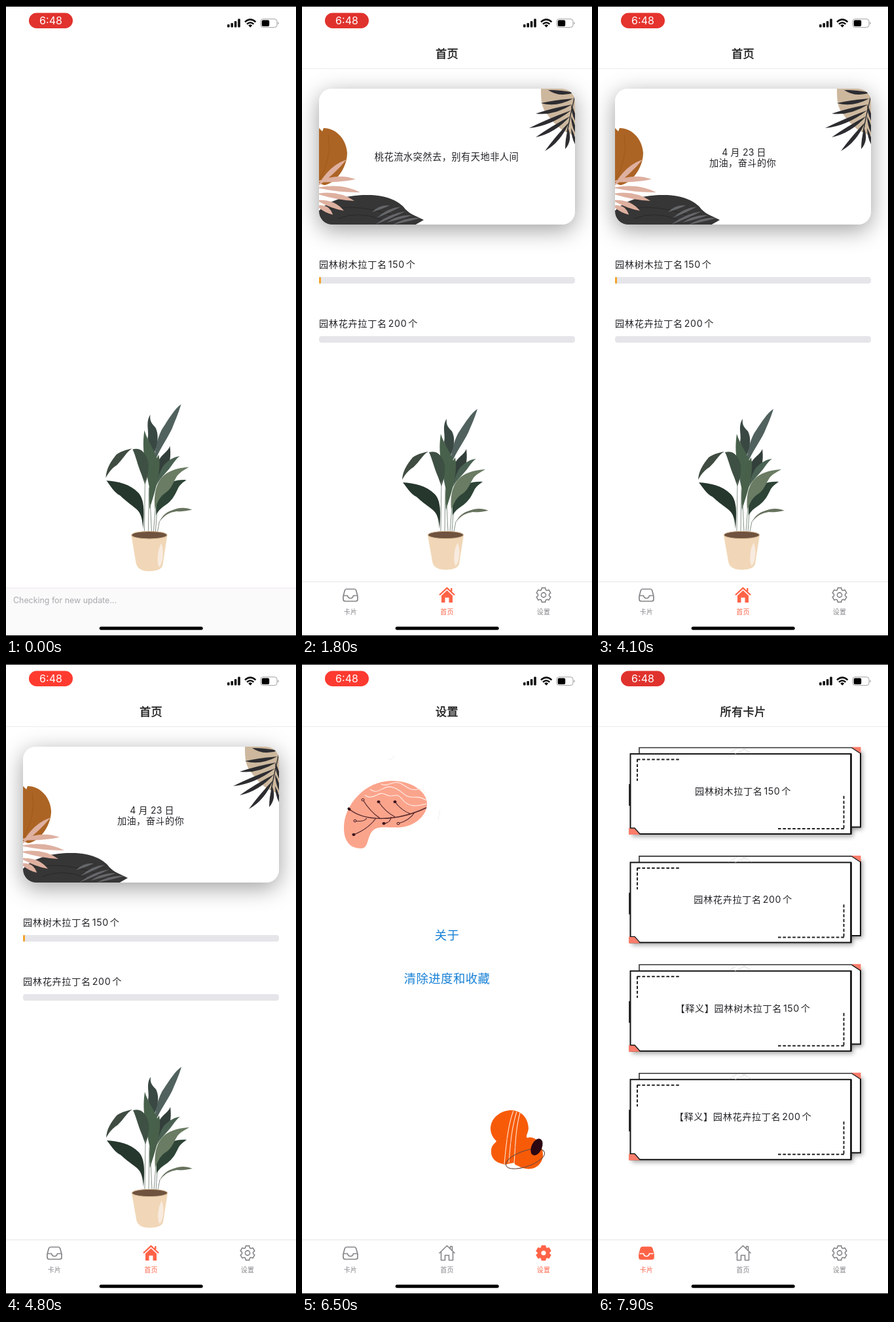
These frames come from a looping animation (443x960 px, 8000 ms). An HTML page:

```html
<!DOCTYPE html>
<html lang="zh-CN">
<head>
<meta charset="utf-8">
<style>
html, body { margin: 0; width: 100%; height: 100%; overflow: hidden; background: #fff; }
svg { display: block; width: 100vw; height: 100vh; }
text { font-family: Inter, "Noto Sans CJK SC", "Noto Sans CJK", sans-serif; }
</style>
</head>
<body>
<svg id="stage" viewBox="0 0 443 960" xmlns="http://www.w3.org/2000/svg"></svg>
<script>
const LOOP = 8000, HOME_AT = 600, SETTINGS_AT = 5000, CARDS_AT = 7650;
const PRESS_AT = 2150, RELEASE_AT = 2370;
const GRAY = '#858589', TOMATO = '#ff6347', INK = '#252529';

const shape = (d, fill) => `<path d="${d}" fill="${fill}"/>`;
const line = (d, color, width = 1, extra = '') =>
  `<path d="${d}" fill="none" stroke="${color}" stroke-width="${width}" ${extra}/>`;
const rect = (x, y, w, h, fill, r = 0, extra = '') =>
  `<rect x="${x}" y="${y}" width="${w}" height="${h}" rx="${r}" fill="${fill}" ${extra}/>`;
const label = (s, x, y, size, fill = INK, spacing = .4, anchor = 'middle', extra = '') =>
  `<text x="${x}" y="${y}" font-size="${size}" fill="${fill}" letter-spacing="${spacing}" text-anchor="${anchor}" ${extra}>${s}</text>`;
const group = (id, body, extra = '') => `<g id="${id}" ${extra}>${body}</g>`;
// Hair space between Chinese characters and digits.
const spaced = s => s.replace(/\d+/, '\u200a$&\u200a');

// Pointed leaf from base to tip; bend pushes the middle sideways.
function leaf(x1, y1, x2, y2, width, fill, bend = 0) {
  const dx = x2 - x1, dy = y2 - y1, len = Math.hypot(dx, dy);
  const side = k => `${x1 + dx * .55 - dy / len * k} ${y1 + dy * .55 + dx / len * k}`;
  return shape(`M${x1} ${y1}Q${side(bend + width)} ${x2} ${y2}Q${side(bend - width)} ${x1} ${y1}Z`, fill);
}

const plant = [
  ['M268 614C258 620 246 640 238 652C232 664 229 676 227 692L231 691C238 676 247 664 254 650C260 636 264 627 268 614Z', '#51625e'],
  ['M221 629C213 641 220 654 217 664L225 690C235 668 233 656 229 648C222 641 220 637 221 629Z', '#394842'],
  ['M251 675C248 684 236 688 233 699C230 711 230 719 231 727C248 712 254 699 251 675Z', '#333f3b'],
  ['M266 690C256 691 247 697 241 704C236 711 233 720 230 734C236 722 245 715 252 706C258 698 261 693 266 690Z', '#4a6253'],
  ['M212 652C208 680 213 690 213 705L220 738C233 718 235 702 230 690C225 677 217 668 212 652Z', '#48614c'],
  ['M234 688C222 704 217 736 220 768C227 744 239 714 234 688Z', '#48604a'],
  ['M194 680C199 690 201 702 208 718L213 732C219 715 220 702 216 693C210 680 203 678 194 680Z', '#3e5043'],
  ['M193 679C182 681 174 684 169 688C160 699 154 708 153 722C158 713 163 707 170 703C180 694 184 684 193 679Z', '#404c42'],
  ['M154 726C172 727 190 731 203 744C212 754 212 770 210 797C209 783 207 774 200 768C190 760 186 758 175 748C165 743 160 733 154 726Z', '#26372d'],
  ['M276 725C260 724 247 729 240 737C231 747 229 758 230 777C234 768 240 765 247 760C257 752 260 744 264 736C268 730 272 728 276 725Z', '#2d4436'],
  ['M280 706C262 707 247 712 239 721C230 731 226 745 228 768C232 757 236 749 244 744C254 738 256 728 262 719C268 712 274 710 280 706Z', '#6a7c63'],
  ['M285 769C278 766 270 765 262 767C250 771 242 772 234 788C242 777 249 773 261 771C272 772 277 770 285 769Z', '#68735f'],
].map(p => shape(...p)).join('') +
  line('M213 725L212 800M219 736L218 801M221 760L223 801M229 764L226 801M231 774L229 801M235 786L232 801', '#79877a', .9) +
  shape('M192 806L199 846Q201 859 219 859Q238 859 240 850L247 806Z', '#f1d7b7') +
  '<ellipse cx="219.5" cy="806" rx="27" ry="5.6" fill="#6f533f" stroke="#d9bb98"/>' +
  shape('M238 818C231 828 231 850 235 853C241 845 242 829 238 818Z', '#f8ebe0');

const splash = rect(0, 887, 443, 72, '#fafafb') + rect(0, 886.5, 443, 1, '#ece6ee') +
  label('Checking for new update...', 11, 910, 12.4, '#a9a9ad', 0, 'start');

function cardArt() {
  const palm = [[376, 128], [365, 148], [357, 164], [347, 186], [357, 200], [371, 221], [402, 218]];
  const fronds = palm.map(([x, y], i) => leaf(416 - i * 1.6, 132 + i * 9, x, y, 6, '#2d2d31', -4)).join('');
  const pink = [[82, 264, 268], [89, 284, 277], [80, 297, 286], [64, 312, 296], [47, 318, 304]];
  return shape('M365 126H417V197C402 195 385 180 376 167C365 155 365 142 365 126Z', '#cdb89e') +
    fronds + [150, 168, 186].map(y => leaf(411, y, 419, y + 28, 4, '#2d2d31')).join('') +
    line('M419 128Q411 160 405 192', '#2d2d31', 1.4) +
    shape('M26 186L31 191L33 186C52 186 68 203 69 224C69 246 52 270 34 273L26 270Z', '#ac6424') +
    line('M27 264Q46 231 40 197', '#9c5719', .8) +
    shape('M26 312C45 292 78 287 105 288C130 289 146 297 155 306C162 316 172 319 186 326L172 334H26Z', '#373636') +
    line('M40 310Q90 300 146 322M55 324Q86 311 123 326', '#292829', 1) +
    [[134, 304, 107, 314], [151, 306, 114, 323], [158, 313, 112, 333], [168, 319, 129, 330], [181, 323, 139, 333]]
      .map(([x, y, a, b]) => leaf(a, b, x, y, 4, '#65676b', -3)).join('') +
    pink.map(([x, y, base]) => leaf(22, base, x, y, 8, '#deb0a0', -4)).join('') +
    leaf(24, 275, 68, 234, 8, '#deb0a0', -4);
}

function progress(text, y, done) {
  return label(spaced(text), 26, y + 5, 14.2, INK, .65, 'start') +
    rect(26, y + 19.5, 391, 10, '#e6e5ea', 4) + (done ? rect(26, y + 19.5, 3, 10, '#f3a52c', 1) : '');
}

const home = group('banner',
    rect(26, 126, 391, 207, '#fff', 20, 'filter="url(#bannerShadow)"') +
    `<g clip-path="url(#bannerClip)">${cardArt()}</g>` +
    group('verse', label('桃花流水突然去，别有天地非人间', 221, 235, 14.3)) +
    group('cheer', label('4 月 23 日', 223, 228, 14, INK, .2) + label('加油，奋斗的你', 221, 244, 14.2))) +
  progress('园林树木拉丁名150个', 393.5, true) +
  progress('园林花卉拉丁名200个', 483.5, false);

const twigs = [[93, 207, 119, 235], [117, 210, 142, 233], [142, 210, 165, 228], [81, 239, 99, 235],
  [79, 260, 113, 235], [125, 243, 136, 233], [147, 243, 172, 226]];
const settings =
  shape('M64 250C64 215 96 178 137 178C170 178 191 196 191 213C191 232 170 249 147 249C128 250 111 244 104 260C99 271 100 281 90 281C72 281 64 268 64 250Z', '#fba48c') +
  line('M121 183C130 188 138 178 148 181S163 194 176 191S185 195 188 197M104 191C118 201 123 183 139 188S155 204 171 203S184 207 190 207M96 200C109 209 117 192 128 199S143 193 153 206S176 217 190 213', '#fff0e9', 1.1) +
  line('M72 221C95 240 143 241 190 219', '#55282b', 1.5) +
  twigs.map(([x, y, a, b], i) => line(`M${x} ${y}Q${(x + a) / 2 + (i > 2 ? 5 : -2)} ${(y + b) / 2 + 4} ${a} ${b}`, '#55282b', 1.2) +
    `<ellipse cx="${x}" cy="${y}" rx="2.1" ry="1.7" fill="${i % 3 ? '#3c151d' : '#fba48c'}" stroke="#3c151d"/>`).join('') +
  '<ellipse cx="72" cy="221" rx="2.7" ry="2" fill="#2b1018" transform="rotate(35 72 221)"/>' +
  line('M131 145Q137 147 141 140M211 222L208 238', '#e9eeee', .8) +
  label('关于', 221.5, 420, 18.4, '#1680d6') +
  label('清除进度和收藏', 221.5, 486, 18.4, '#1680d6') +
  shape('M288 707C289 690 305 680 320 680C338 681 346 695 346 708C345 716 341 720 344 722C358 717 369 735 368 750C366 766 352 771 342 769C333 768 329 762 322 763C308 764 288 760 289 742C289 732 296 730 297 727C290 720 288 714 288 707Z', '#f75b08') +
  shape('M313 762L324 760L327 765L314 768Z', '#fff') +
  line('M323 681C315 701 312 731 309 762M328 682C320 707 318 735 316 760M333 684C326 709 326 735 324 761', '#ffe3d2', 1.1) +
  line('M290 699L310 720L291 740M311 721L340 752', '#dc5514', .5) +
  '<ellipse cx="341" cy="754" rx="31" ry="12" fill="none" stroke="#6b4a42" stroke-width="1.1" transform="rotate(-19 341 754)"/>' +
  '<ellipse cx="358.5" cy="736" rx="8" ry="13.5" fill="#2b0712" transform="rotate(24 358.5 736)"/>';

function deckCard(text, i) {
  const dots = 'stroke-dasharray="4.6 2.8"';
  return `<g transform="translate(0 ${i * 165.4})">` +
    rect(66, 134, 338, 118, '#777', 0, 'filter="url(#soft)" opacity=".75"') +
    rect(52, 145, 338, 118, '#777', 0, 'filter="url(#soft)" opacity=".65"') +
    rect(63, 127.5, 338, 121, '#fff') +
    line('M63 137V127.5H388', '#333', 1.6) + line('M388 127.5L401 136V248.5H387', '#161616', 2) +
    shape('M387 126.5H401.5V136Z', '#fc7d6b') +
    rect(49.5, 137, 337, 122, '#fff', 0, 'stroke="#161616" stroke-width="2"') +
    line('M386.5 137V259M48.5 183V216', '#161616', 2.6) +
    line('M200 136L212 129M209 137L226 129M221 129L235 136', '#d5d3d9', .8) +
    shape('M47 250H56L64 260H47Z', '#fc7d6b') + line('M49 250H56L64 259', '#161616', 1.4) +
    line('M60 145.5H126M60 145V178M275 251H376M375.5 201V252', '#222', 2, dots) +
    label(spaced(text), 221.5, 199, 14.2, INK, .6) + '</g>';
}
const cards = ['园林树木拉丁名150个', '园林花卉拉丁名200个', '【释义】园林树木拉丁名150个', '【释义】园林花卉拉丁名200个']
  .map(deckCard).join('');

function gearPath() {
  const points = [];
  for (let i = 0; i < 6; i++)
    for (const [deg, r] of [[-22, 8.6], [-14, 11.2], [14, 11.2], [22, 8.6]]) {
      const a = (i * 60 + deg - 90) * Math.PI / 180;
      points.push(`${(369 + r * Math.cos(a)).toFixed(2)} ${(897.5 + r * Math.sin(a)).toFixed(2)}`);
    }
  return `M${points.join('L')}Z`;
}

const icons = {
  cards: (c, on) => `<path d="M68 888.5H80Q82 888.5 82.6 890.5L85 899V904Q85 907 82 907H66Q63 907 63 904V899L65.4 890.5Q66 888.5 68 888.5Z" fill="${on ? c : 'none'}" stroke="${c}" stroke-width="1.7"/>` +
    line('M63.5 898.5H69.5Q70.5 902.5 74 902.5T78.5 898.5H84.5', on ? '#fff' : c, 1.6),
  home: (c, on) => on
    ? shape('M213 898.5L221.5 890.5L230 898.5V909H224.5V901.5H218.5V909H213Z', c) +
      line('M210 897.5L221.5 886.8L233 897.5M228.3 892V887', c, 2.3, 'stroke-linejoin="round"')
    : line('M209.5 898L221.5 886.5L233.5 898M212.5 896V908.5H218.5V901H224.5V908.5H230.5V896M226.5 890.5V887.5H229.5V894', c, 1.6, 'stroke-linejoin="round"'),
  settings: (c, on) => `<path d="${gearPath()}" fill="${on ? c : 'none'}" stroke="${c}" stroke-width="1.6" stroke-linejoin="round"/>` +
    `<circle cx="369" cy="897.5" r="3.6" fill="${on ? '#fff' : 'none'}" stroke="${on ? '#fff' : c}" stroke-width="${on ? 0 : 1.6}"/>`,
};
const tabs = [['cards', 74, '卡片'], ['home', 221.5, '首页'], ['settings', 369, '设置']];

function chrome(active, title) {
  return label(title, 221.5, 79, 17.2, '#1c1c1e', .3, 'middle', 'stroke="#1c1c1e" stroke-width=".4"') +
    rect(0, 95, 443, 1, '#ebebed') + rect(0, 877, 443, 1, '#e5e5e7') +
    tabs.map(([id, x, name]) => {
      const color = id === active ? TOMATO : GRAY;
      return icons[id](color, id === active) + label(name, x, 926.5, 10, color, .3);
    }).join('');
}

const status = rect(35, 10.5, 67, 23.5, '#e0322d', 11.7, 'id="pill"') +
  label('6:48', 68.5, 28.2, 16, '#fff', 0) +
  [4.5, 6.5, 9.5, 13].map((h, i) => rect(338 + i * 5.4, 32.5 - h, 3.6, h, '#111', 1)).join('') +
  line('M365 24.4Q373.2 16.8 381.4 24.4M368 27.6Q373.2 23 378.4 27.6', '#111', 2.5) +
  shape('M370.2 29.6Q373.2 27 376.2 29.6L373.2 32.8Z', '#111') +
  rect(389, 19.8, 25, 12.8, 'none', 3.8, 'stroke="#a0a0a3"') +
  rect(390.7, 21.5, 11.5, 9.4, '#000', 2) + shape('M415.4 24Q418.2 26.2 415.4 28.4Z', '#a0a0a3') +
  rect(142.7, 945.7, 158, 5, '#000', 2.5) +
  rect(0, 0, 443, 1, '#000') + rect(0, 959, 443, 1, '#000');

document.getElementById('stage').innerHTML = `<defs>
  <filter id="bannerShadow" x="-20%" y="-40%" width="140%" height="190%"><feDropShadow dx="0" dy="8" stdDeviation="17" flood-color="#000" flood-opacity=".38"/></filter>
  <filter id="soft" x="-10%" y="-20%" width="120%" height="140%"><feGaussianBlur stdDeviation="3.5"/></filter>
  <clipPath id="bannerClip">${rect(26, 126, 391, 207, '#000', 20)}</clipPath></defs>` +
  rect(0, 0, 443, 960, '#fff') +
  group('splash', splash) +
  group('home', home + chrome('home', '首页')) +
  group('settings', chrome('settings', '设置') + settings) +
  group('cards', chrome('cards', '所有卡片') + cards) +
  group('plant', plant) + status;

const el = id => document.getElementById(id);
const show = (id, on) => el(id).setAttribute('display', on ? 'inline' : 'none');
const clamp = v => Math.max(0, Math.min(1, v));
const ease = v => v * v * (3 - 2 * v);

function render(t) {
  const screen = t < HOME_AT ? 'splash' : t < SETTINGS_AT ? 'home' : t < CARDS_AT ? 'settings' : 'cards';
  for (const id of ['splash', 'home', 'settings', 'cards']) show(id, id === screen);
  show('plant', t < SETTINGS_AT);
  el('plant').setAttribute('transform', screen === 'splash' ? 'matrix(1 0 0 1.037 -.6 -29.6)' : '');

  const dim = t < RELEASE_AT ? clamp((t - PRESS_AT) / 150) : 1 - clamp((t - RELEASE_AT) / 300);
  el('banner').setAttribute('opacity', 1 - .8 * ease(dim));
  show('verse', t < RELEASE_AT);
  show('cheer', t >= RELEASE_AT);

  const glow = clamp(.6 + .65 * Math.cos(2 * Math.PI * (t / 2000 - .42)));
  el('pill').setAttribute('fill', `rgb(${224 + 31 * glow},${50 + 9 * glow},${45 + 3 * glow})`);
}

const start = performance.now();
function tick() {
  render((performance.now() - start) % LOOP);
  requestAnimationFrame(tick);
}
tick();
</script>
</body>
</html>
```
